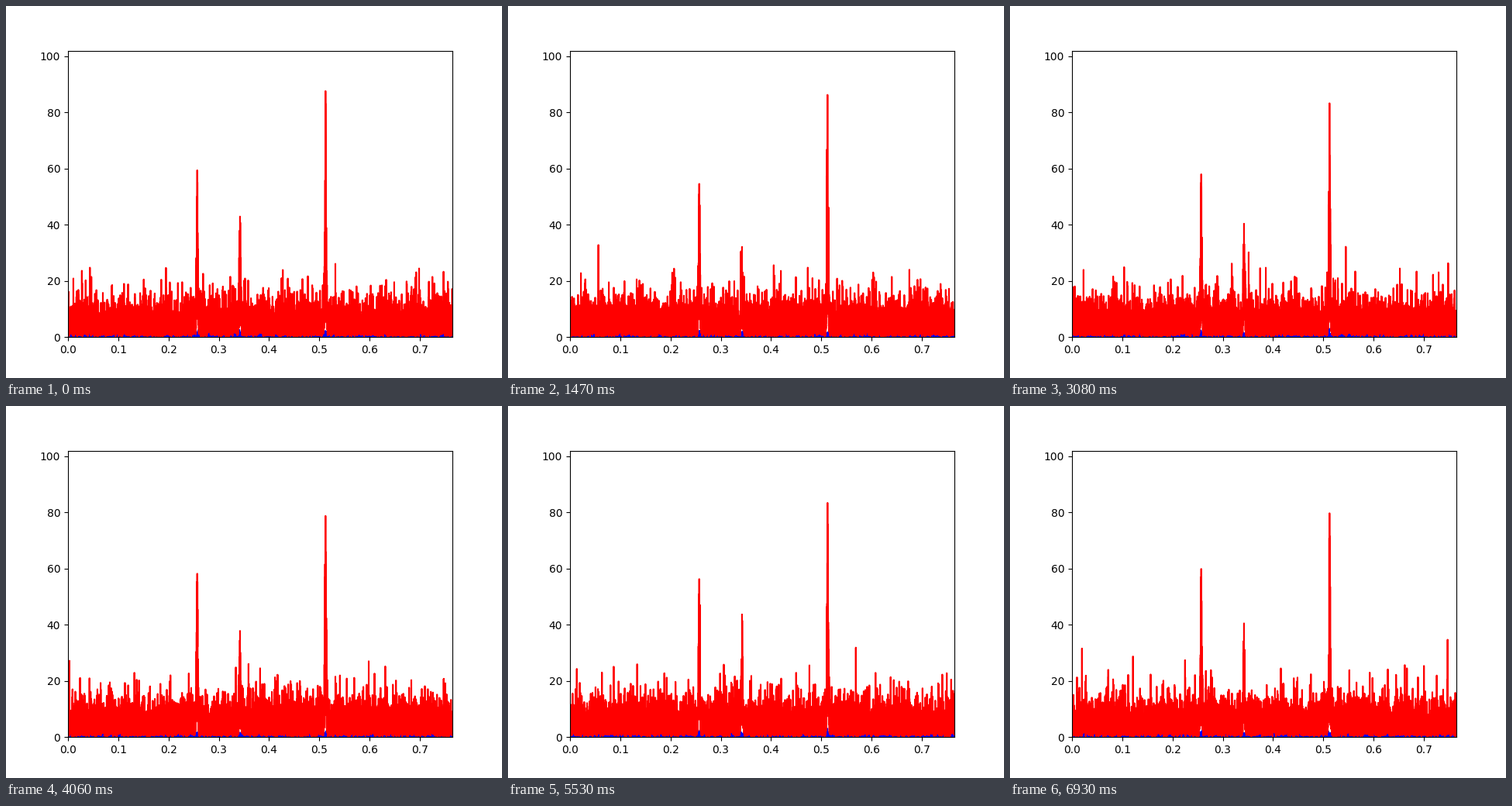
Write a matplotlib script that moves like this. It is 640 by 480 pixels and loops after 7 s.

```python
import matplotlib.pyplot as plt
import numpy as np
from matplotlib.animation import FuncAnimation

FRAMES, INTERVAL = 100, 70
X_MAX, Y_MAX = 0.765, 102
POINTS = 8600
SEED = 4100

# Centre, mean height and spread of each spectral line.
PEAKS = ((0.2572, 59, 3.5), (0.3423, 42, 5), (0.5125, 82, 5.5))
PEAK_WIDTH = 0.0019

freq = np.linspace(0, X_MAX, POINTS)


def spectrum(frame):
    """Return the strong and the weak power spectrum of one frame."""
    rng = np.random.default_rng(SEED + frame)
    strong = rng.gamma(2, 2.45, POINTS)
    weak = rng.exponential(0.42, POINTS)

    for center, mean, spread in PEAKS:
        height = rng.normal(mean, spread)
        shape = np.exp(-((freq - center) / PEAK_WIDTH) ** 2)
        near = shape > 0.01
        ripple = 0.12 + 0.83 * rng.random(POINTS) ** 2
        strong[near] += (height * shape * ripple)[near]
        strong[near] = np.minimum(strong[near], 0.95 * height)
        strong[np.argmax(shape)] = height
        weak += shape * rng.exponential(0.25, POINTS)
    return strong, weak


fig, ax = plt.subplots(figsize=(6.4, 4.8), dpi=100)
ax.set_xlim(0, X_MAX)
ax.set_ylim(0, Y_MAX)
weak_line, = ax.plot([], [], color="blue")
strong_line, = ax.plot([], [], color="red")


def update(frame):
    strong, weak = spectrum(frame)
    weak_line.set_data(freq, weak)
    strong_line.set_data(freq, strong)
    return weak_line, strong_line


anim = FuncAnimation(fig, update, frames=FRAMES, interval=INTERVAL, repeat=True)
plt.show()
```
